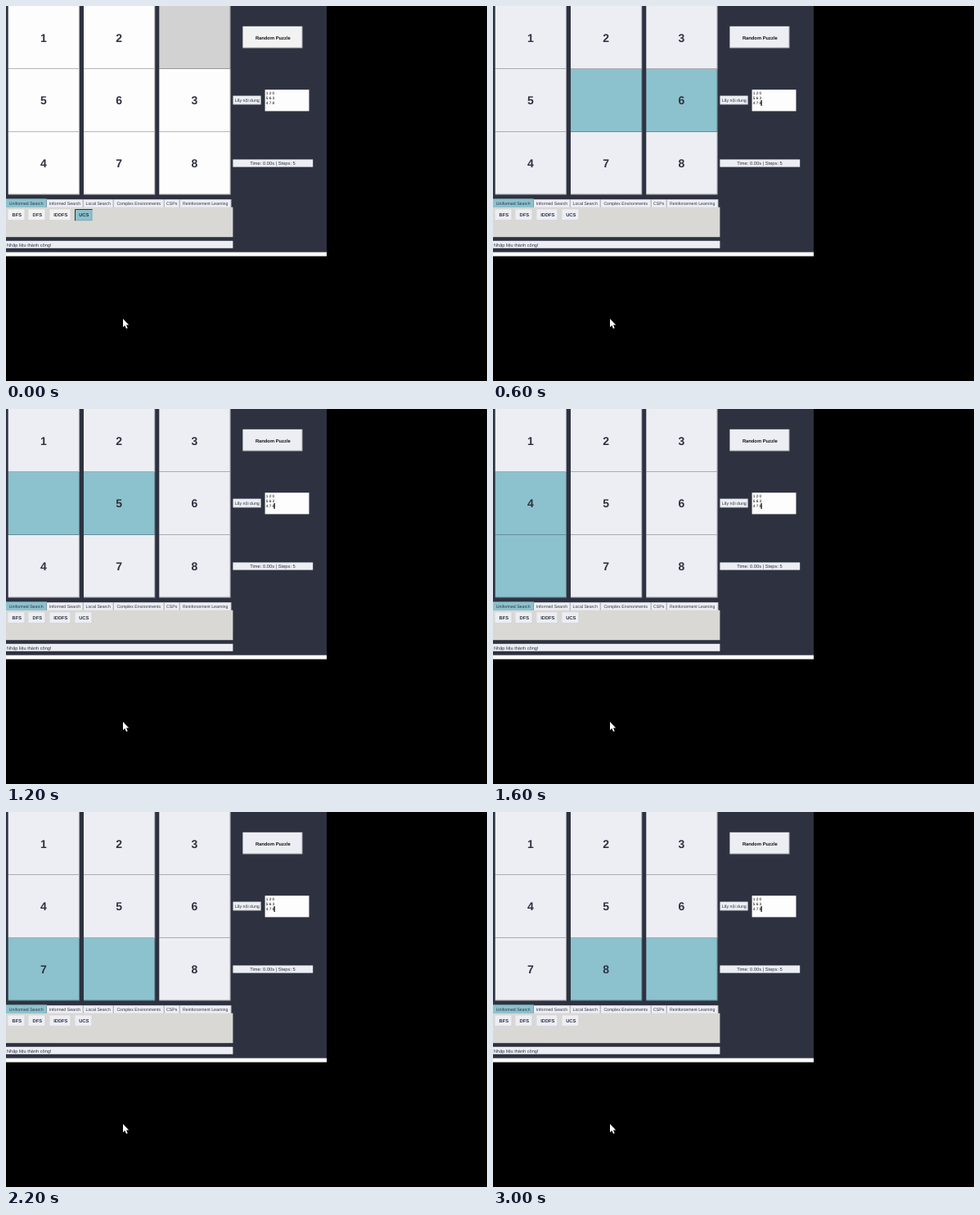
These frames come from a looping animation (588 px wide and 458 px high, 3100 ms). An HTML page:

```html
<!DOCTYPE html>
<html lang="vi">
<head>
<meta charset="utf-8">
<style>
  html, body { margin: 0; width: 100%; height: 100%; overflow: hidden; background: #000; }
  svg { display: block; font-family: "Liberation Sans", Arial, sans-serif; text-rendering: geometricPrecision; }
</style>
</head>
<body>
<svg id="stage" width="588" height="458" viewBox="0 0 588 458"></svg>
<script>
const LOOP = 3100, FIRST = 100, STEP = 500;
const DARK = '#2e3240', PALE = '#eceef3', WHITE = '#fdfdfd', TEAL = '#8cc2cd',
      SLATE = '#4d5669', GRAY = '#d2d2d2', INK = '#2e3240', OFF_WHITE = '#f2f2f2';
const stage = document.getElementById('stage');

function add(tag, attrs, text = '') {
  const el = document.createElementNS('http://www.w3.org/2000/svg', tag);
  for (const k in attrs) el.setAttribute(k, attrs[k]);
  el.textContent = text;
  return stage.appendChild(el);
}

const rect = (x, y, width, height, fill) => add('rect', { x, y, width, height, fill });

// Text whose capitals are centred vertically on y
function label(text, x, y, size, { bold = false, anchor = 'middle', fill = INK } = {}) {
  return add('text', { x, y: y + size * 0.36, fill, 'font-size': size,
    'font-weight': bold ? 700 : 400, 'text-anchor': anchor }, text);
}

// Raised box with a darker bottom-right edge
function raised(x, y, w, h, shade = .22) {
  const face = rect(x, y, w, h, PALE);
  add('path', { d: `M${x} ${y + h - .5}H${x + w - .5}V${y}`, stroke: '#000', 'stroke-opacity': shade, fill: 'none' });
  return face;
}

rect(0, 0, 392, 300.6, DARK);
rect(0, 300.6, 392, 5, WHITE);

// Board
const cells = [];
for (let i = 0; i < 9; i++) {
  const col = i % 3, row = Math.floor(i / 3);
  const x = 2.7 + col * 92.3, y = row * 77;
  cells.push({
    face: raised(x, y, 87.2, row < 2 ? 77 : 76.4, .28),
    digit: label('', 46 + col * 92.25, 38.5 + row * 76.7, 14, { bold: true })
  });
}

// Right panel
const randomButton = raised(289.4, 24.8, 73, 26.6);
label('Random Puzzle', 326.3, 38.5, 5.8, { bold: true, fill: '#101218' });
raised(277.5, 109.6, 34.2, 10.8, .1);
label('Lấy nội dung', 294.7, 115, 5.25);
rect(316.6, 102.2, 53.9, 26.2, WHITE);
['1 2 0', '5 6 3', '4 7 8'].forEach((line, i) =>
  label(line, 317.8, 106 + i * 6.1, 4.7, { anchor: 'start', fill: '#000' }));
const caret = rect(327.5, 115, 1.2, 7, '#000');
rect(277.4, 187.4, 97.8, 9.2, PALE);
label('Time: 0.00s | Steps: 5', 326, 192, 5.75);

// Tabs
rect(0, 236.2, 275.3, 9.8, PALE);
rect(0, 245.7, 277.4, 36.5, '#d9d8d4');
[['Uniformed Search', 0, 50], ['Informed Search', 50, 44.5], ['Local Search', 94.5, 37],
 ['Complex Environments', 131.5, 62], ['CSPs', 193.5, 19], ['Reinforcement Learning', 212.5, 63]
].forEach(([name, x, w], i) => {
  if (!i) rect(x, 235.4, w, 10.6, TEAL);
  rect(x + w - .7, 236.2, .7, 9.5, '#85888f');
  label(name, x + w / 2 - .3, 241, 5.2);
});

const modes = [['BFS', 2, 22], ['DFS', 27, 22], ['IDDFS', 53, 27], ['UCS', 84, 22]].map(([name, x, w]) => {
  const face = raised(x + .5, 248.4, w - 1, 13.8, .12);
  label(name, x + w / 2 + .3, 255.2, 5.75, { bold: true });
  return face;
});
const pressed = add('path', { d: 'M84.5 262.2V248.5H105.5', stroke: '#24343c', fill: 'none' });

rect(0, 286.8, 277.4, 9, PALE);
label('Nhập liệu thành công!', 1, 291.7, 5.6, { anchor: 'start' });

const pointer = add('path', { d: 'M143 382v10.3l2.3-2.2 1.7 3.9 1.7-.8-1.7-3.7h3.2z', fill: '#fff' });

// Board states: the blank walks along this path
const blanks = [2, 5, 4, 3, 6, 7, 8];
const boards = [[1, 2, 0, 5, 6, 3, 4, 7, 8]];
for (let i = 1; i < blanks.length; i++) {
  const next = [...boards[i - 1]];
  next[blanks[i - 1]] = next[blanks[i]];
  next[blanks[i]] = 0;
  boards.push(next);
}

const show = (el, on) => el.setAttribute('visibility', on ? 'visible' : 'hidden');

function draw(t) {
  const step = t < FIRST ? 0 : 1 + Math.floor((t - FIRST) / STEP);
  const start = step === 0;
  boards[step].forEach((n, i) => {
    const lit = step > 1 && (i === blanks[step] || i === blanks[step - 1]);
    const fill = lit ? TEAL : n ? (start ? WHITE : PALE) : (start ? GRAY : SLATE);
    cells[i].face.setAttribute('fill', fill);
    cells[i].digit.textContent = n || '';
  });
  randomButton.setAttribute('fill', start ? OFF_WHITE : PALE);
  modes.forEach((m, i) => m.setAttribute('fill', !start ? PALE : i === 3 ? TEAL : OFF_WHITE));
  show(pressed, start);
  show(caret, t >= 300 && (t - 300) % 900 < 600);
  pointer.setAttribute('transform', `translate(0 ${t < 2200 ? 0 : -1})`);
}

const begin = performance.now();
function frame() {
  draw((performance.now() - begin) % LOOP);
  requestAnimationFrame(frame);
}
frame();
</script>
</body>
</html>
```
